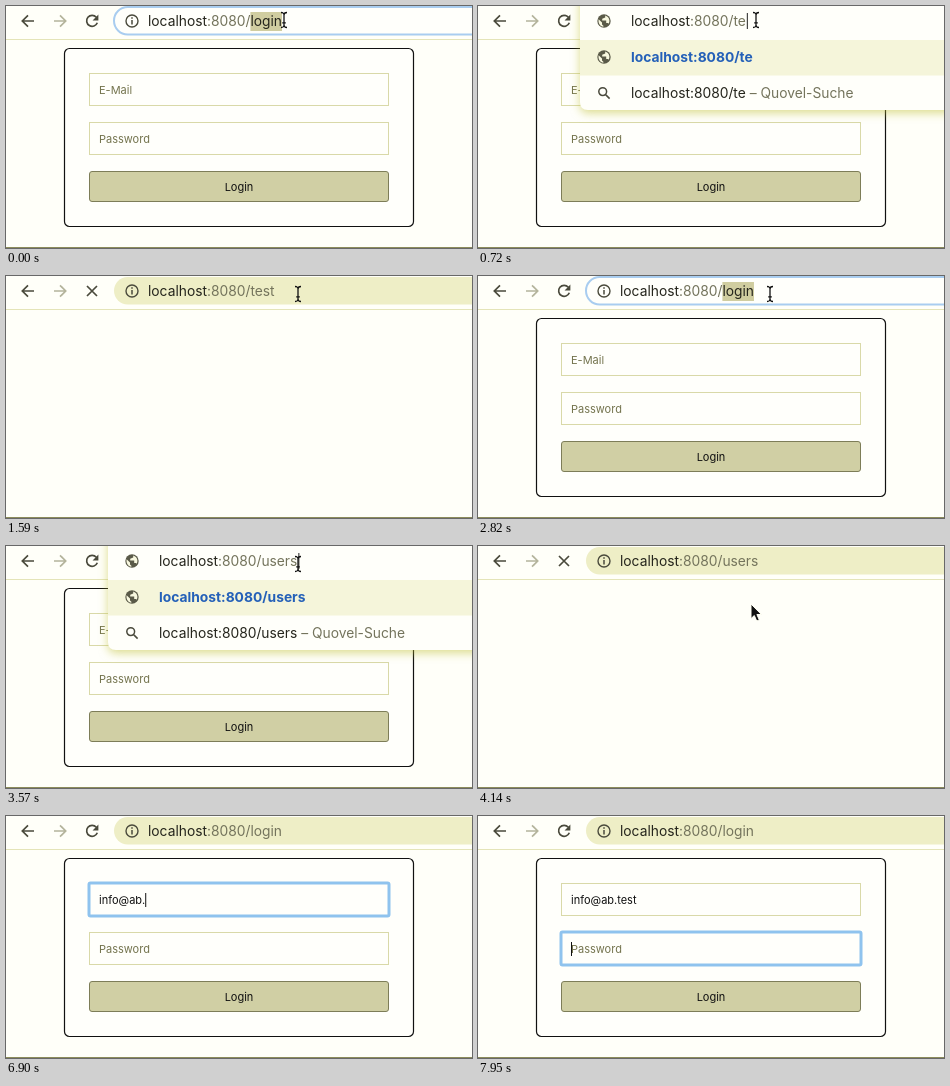
An HTML page for the animation above (8000 ms loop, 466 by 242 pixels).

```html
<!DOCTYPE html>
<html lang="de">
<head>
<meta charset="utf-8">
<title>Login redirect</title>
<style>
  html, body { margin: 0; width: 100%; height: 100%; overflow: hidden; background: #fffff9; }
  svg { display: block; width: 466px; height: 242px; font-family: Inter, Roboto, sans-serif; }
  .url { font-size: 13.8px; fill: #25251c; white-space: pre; }
  .url .dim { fill: #74745c; }
  .form { font-size: 11px; fill: #111; }
  .hint { fill: #74744e; }
  .line { fill: none; stroke: #4a4a3c; stroke-width: 1.7; }
  .field { fill: #fffffb; stroke: #d9d9a8; }
  .ring { fill: none; stroke: #8fc3ee; stroke-width: 3; }
  .panel { filter: drop-shadow(0 3px 5px rgba(190, 190, 50, .55)); }
</style>
</head>
<body>
<svg viewBox="0 0 466 242">
  <defs>
    <g id="globe">
      <circle r="6.7" fill="#5a5a48"/>
      <path d="M-5.4 -1.8L-2 1.5V3.4L-.6 4.8V5.8C-4 5.4 -6 2 -5.4 -1.8ZM1.2 -5.4V-3.6L-1.8 -2.2V-.5H2.2V2H4.2L4.6 3C6.3 .2 5.5 -4 1.2 -5.4Z" fill="#f8f8df"/>
    </g>
  </defs>
  <rect width="466" height="242" fill="#fffff9"/>

  <g id="page">
    <rect x="58.5" y="42.5" width="349" height="178" rx="5" fill="#fffffb" stroke="#111" stroke-width="1.2"/>
    <rect class="field" x="83.5" y="67.5" width="299" height="32"/>
    <rect class="field" x="83.5" y="116.5" width="299" height="32"/>
    <rect id="mailRing" class="ring" x="83" y="67" width="300" height="33" rx="1.5"/>
    <rect id="passRing" class="ring" x="83" y="116" width="300" height="33" rx="1.5"/>
    <rect x="83.5" y="165.5" width="299" height="30" rx="2.5" fill="#d0cfa4" stroke="#7d7d58"/>
    <g class="form">
      <text id="mail" x="93" y="88"></text>
      <text class="hint" x="93" y="137">Password</text>
      <text x="233" y="185" text-anchor="middle">Login</text>
    </g>
    <rect id="formCaret" width="1" height="14" fill="#111"/>
  </g>

  <path d="M0 33.5H466" stroke="#e4e4b8"/>
  <path d="M0 241.5H466" stroke="#8c8c5c"/>
  <path class="line" d="M28 15H16.5M22 9.3L16.3 15L22 20.7"/>
  <path class="line" d="M48 15H59.5M54 9.3L59.7 15L54 20.7" style="stroke:#b4b49c"/>
  <g id="reload">
    <path class="line" d="M90.3 11.2A5.5 5.5 0 1 0 91.3 16.8"/>
    <path d="M92.4 8.6V14.4H86.6Z" fill="#4a4a3c"/>
  </g>
  <path id="stop" class="line" d="M81 10L91 20M91 10L81 20"/>

  <rect id="pill" x="108" y="1" width="400" height="27.5" rx="13.7"/>
  <g id="panel">
    <path class="panel" d="M102 -20H490V104H110Q102 104 102 96Z" fill="#fffffa"/>
    <rect x="102" y="34" width="364" height="35.5" fill="#f5f5da"/>
    <use href="#globe" x="126" y="15"/>
    <use href="#globe" x="126" y="51"/>
    <path class="line" d="M127.6 88.6L131.6 92.6M128.6 85.6a3.9 3.9 0 1 1 -7.8 0a3.9 3.9 0 1 1 7.8 0" style="stroke-width:1.5"/>
    <text id="pick" class="url" x="153" y="56" font-weight="700" style="fill:#2460b8"></text>
    <text class="url" x="153" y="92"><tspan id="query"></tspan><tspan class="dim"> – Quovel-Suche</tspan></text>
  </g>
  <g id="info">
    <circle class="line" cx="126" cy="15" r="6" style="stroke-width:1.4"/>
    <path class="line" d="M126 14V18.4M126 11.2V12.8" style="stroke-width:1.5"/>
  </g>
  <rect id="mark" y="6" height="19" fill="#d0cda0"/>
  <text id="url" class="url" y="20"><tspan>localhost</tspan><tspan class="dim">:8080/</tspan><tspan id="tail"></tspan></text>
  <rect id="urlCaret" y="7" width="1" height="16" fill="#222"/>

  <g id="mouse">
    <path id="beam" d="M-3 -7.5Q0 -7.5 0 -5Q0 -7.5 3 -7.5M0 -5.5V5.5M-3 7.5Q0 7.5 0 5Q0 7.5 3 7.5M-1.8 2.8H1.8" fill="none" stroke="#111" stroke-width="1.3"/>
    <path id="arrow" d="M0 0V14.6L3.3 11.5L5.7 17L8.3 15.9L5.9 10.5H10.4Z" fill="#111" stroke="#fffff4" stroke-width="1"/>
  </g>
</svg>
<script>
const LOOP = 8000;
const EMAIL = 'info@ab.test';
const $ = id => document.getElementById(id);
const show = (id, on) => $(id).style.display = on ? '' : 'none';
const put = (id, attrs) => { for (const k in attrs) $(id).setAttribute(k, attrs[k]); };

// start, path, address bar mode
const bar = [
  [0, 'login', 'word'],
  [450, 't', 'type'], [600, 'te', 'type'], [810, 'tes', 'type'], [960, 'test', 'type'],
  [1350, 'test', 'load'], [1920, 'login', 'idle'],
  [2430, 'login', 'all'], [2580, 'login', 'word'],
  [3030, 'u', 'type'], [3180, 'us', 'type'], [3300, 'use', 'type'],
  [3420, 'user', 'type'], [3570, 'users', 'type'],
  [3870, 'users', 'load'], [4500, 'login', 'idle']
];

// time, x, y
const track = [
  [0, 278, 14], [1170, 278, 14], [1470, 292, 18], [3750, 292, 18],
  [4080, 273, 58], [4770, 273, 58], [5220, 261.5, 81.5], [LOOP, 261.5, 81.5]
];

const focusMail = 5430, typeFrom = 6100, typeStep = 110, focusPass = 7650;

function mouseAt(t) {
  const i = track.findIndex(p => p[0] > t);
  const [t0, x0, y0] = track[i - 1], [t1, x1, y1] = track[i];
  const u = (t - t0) / (t1 - t0), e = u * u * (3 - 2 * u);
  return [x0 + (x1 - x0) * e, y0 + (y1 - y0) * e];
}

function drawBar(path, mode) {
  const typing = mode === 'type', focused = typing || mode === 'word' || mode === 'all';
  const x = typing ? 153 : 142;
  show('reload', mode !== 'load');
  show('stop', mode === 'load');
  show('panel', typing);
  show('info', !typing);
  show('pill', !typing);
  put('pill', focused
    ? { fill: '#fffffb', stroke: '#a9cdf0', 'stroke-width': 2 }
    : { fill: '#eeeec6', stroke: 'none' });
  $('tail').textContent = path;
  $('tail').setAttribute('class', mode === 'word' ? '' : 'dim');
  put('url', { x });
  const end = x + $('url').getComputedTextLength();
  const from = mode === 'all' ? x : end - $('tail').getComputedTextLength();
  show('mark', focused && !typing);
  put('mark', { x: from, width: end - from });
  show('urlCaret', typing);
  put('urlCaret', { x: end + 1 });
  $('pick').textContent = $('query').textContent = 'localhost:8080/' + path;
}

function drawForm(t) {
  const count = Math.max(0, Math.min(EMAIL.length, Math.floor((t - typeFrom) / typeStep) + 1));
  const onPass = t >= focusPass, onMail = t >= focusMail && !onPass;
  show('mailRing', onMail);
  show('passRing', onPass);
  $('mail').textContent = count ? EMAIL.slice(0, count) : 'E-Mail';
  $('mail').setAttribute('class', count ? '' : 'hint');
  const blink = t < 5600 || t >= 6000;
  show('formCaret', onPass || onMail && blink);
  put('formCaret', {
    x: 93 + (onMail && count ? $('mail').getComputedTextLength() : 0),
    y: onPass ? 126 : 77
  });
}

function draw(t) {
  const [, path, mode] = bar.filter(s => s[0] <= t).pop();
  drawBar(path, mode);
  show('page', mode !== 'load');
  drawForm(t);
  const [x, y] = mouseAt(t);
  const overText = y < 30 || y > 67 && mode !== 'load';
  show('mouse', t < typeFrom);
  show('beam', overText);
  show('arrow', !overText);
  put('mouse', { transform: `translate(${x} ${y})` });
}

const start = performance.now();
function tick() {
  draw((performance.now() - start) % LOOP);
  requestAnimationFrame(tick);
}
tick();
</script>
</body>
</html>
```
